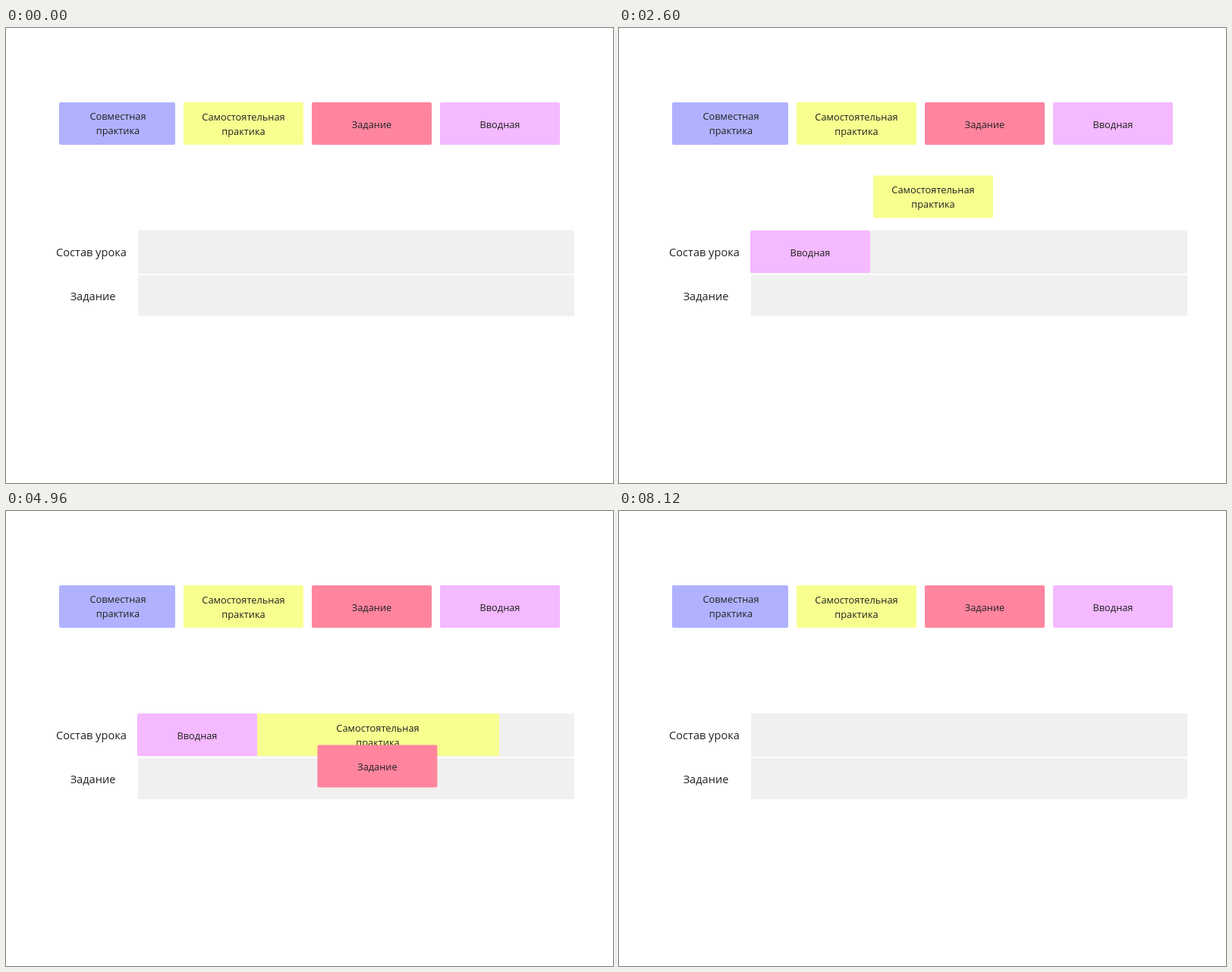
An HTML page with a canvas that plays this animation: 800 by 600 pixels, repeating every 8.64 s.

```html
<!DOCTYPE html>
<html lang="ru">
<head>
<meta charset="utf-8">
<title>Состав урока</title>
<style>
  html, body { margin: 0; width: 100%; height: 100%; overflow: hidden; background: #fff; }
  canvas { display: block; }
</style>
</head>
<body>
<canvas id="stage" width="800" height="600"></canvas>
<script>
const ctx = document.getElementById('stage').getContext('2d');
const LOOP = 8640;
const FADE = { start: 7700, end: 8120 };
const CARD = { width: 158, height: 56 };
const FONT = '"Open Sans", "Noto Sans", sans-serif';
const INK = '#222222';

const joint = { color: '#b0b2ff', lines: ['Совместная', 'практика'], baseline: 23 };
const solo = { color: '#f8ff8f', lines: ['Самостоятельная', 'практика'], baseline: 24 };
const task = { color: '#ff859f', lines: ['Задание'], baseline: 34 };
const intro = { color: '#f4b9ff', lines: ['Вводная'], baseline: 34 };

// Each card travels from the palette to its row; some then widen around their centre.
const drops = [
  { kind: intro, from: [572, 98], to: [173, 267], start: 275, travel: 1260 },
  { kind: solo, from: [234, 98], to: [411, 267], start: 2060, travel: 1260, widen: [3320, 3810] },
  { kind: task, from: [403, 98], to: [411, 325], start: 4040, travel: 1200, widen: [5270, 5760] }
];
const EXTRA_WIDTH = 161;

const clamp = v => Math.min(1, Math.max(0, v));
const progress = (t, start, end) => clamp((t - start) / (end - start));
const mix = (a, b, k) => a + (b - a) * k;

function bezier(x1, y1, x2, y2) {
  const at = (a, b, u) => 3 * a * u * (1 - u) ** 2 + 3 * b * u * u * (1 - u) + u ** 3;
  return x => {
    if (x <= 0 || x >= 1) return clamp(x);
    let low = 0, high = 1;
    for (let i = 0; i < 24; i++) {
      const mid = (low + high) / 2;
      if (at(x1, x2, mid) < x) low = mid; else high = mid;
    }
    return at(y1, y2, low);
  };
}
const ease = bezier(0.27, 0.2, 0.55, 1);

function drawText(text, x, y, size) {
  ctx.font = `${size}px ${FONT}`;
  ctx.fillStyle = INK;
  ctx.textAlign = 'center';
  ctx.fillText(text, x, y);
}

function drawCard(kind, x, y, width = CARD.width, textX = x + width / 2) {
  ctx.fillStyle = kind.color;
  ctx.beginPath();
  ctx.roundRect(x, y, width, CARD.height, 2);
  ctx.fill();
  kind.lines.forEach((line, i) => drawText(line, textX, y + kind.baseline + i * 19, 12.8));
}

function drawBoard() {
  ctx.fillStyle = '#ffffff';
  ctx.fillRect(0, 0, 800, 600);
  drawCard(joint, 70, 98, 153, 147.5);
  for (const { kind, from } of drops) drawCard(kind, ...from);

  ctx.fillStyle = '#f0f0f0';
  ctx.fillRect(174, 267, 575, 57);
  ctx.fillRect(174, 326, 575, 54);
  drawText('Состав урока', 112.5, 301, 14.6);
  drawText('Задание', 114.5, 359, 14.6);
}

function drawDrop({ kind, from, to, start, travel, widen }, t) {
  if (t < start) return;
  const moved = ease(progress(t, start, start + travel));
  const grown = widen ? EXTRA_WIDTH * ease(progress(t, ...widen)) : 0;
  const x = mix(from[0], to[0], moved);
  const y = mix(from[1], to[1], moved);
  drawCard(kind, x - grown * 80 / EXTRA_WIDTH, y, CARD.width + grown, x + CARD.width / 2);
}

function drawPlan(t) {
  const alpha = 1 - progress(t, FADE.start, FADE.end);
  if (alpha === 0) return;
  ctx.globalAlpha = alpha;
  for (const drop of drops) drawDrop(drop, t);
  ctx.globalAlpha = 1;
}

function render() {
  const t = performance.now() % LOOP;
  drawBoard();
  drawPlan(t);
  requestAnimationFrame(render);
}
render();
</script>
</body>
</html>
```
